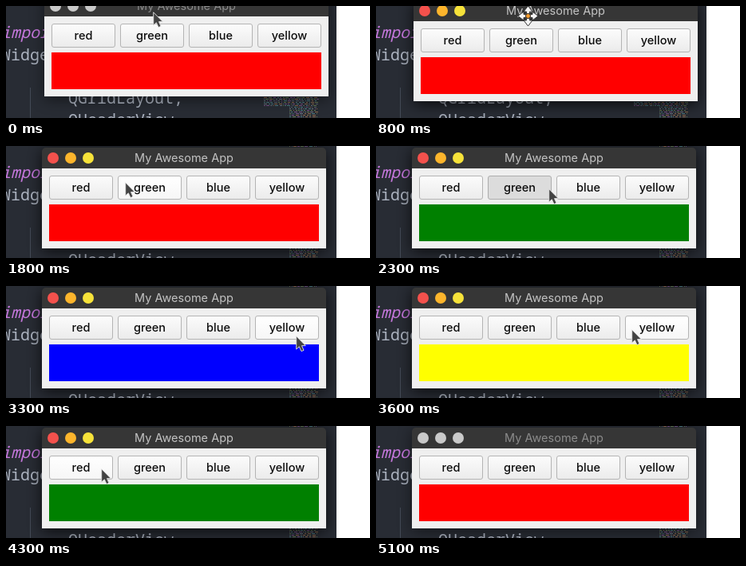
Recreate the animation shown at these times as an HTML page. Size 456 by 140 pixels, loop 5200 ms.

```html
<!DOCTYPE html>
<html lang="en">
<head>
<meta charset="utf-8">
<title>Colour buttons</title>
<style>
  html, body { margin: 0; width: 100%; height: 100%; overflow: hidden; background: #282c34; }
  svg { display: block; }
  .code { font: 20px "Noto Sans Mono", "DejaVu Sans Mono", monospace; fill: #abb2bf; }
  .code .kw { fill: #c678dd; font-style: italic; }
  .ui { font: 14.5px Inter, Roboto, sans-serif; text-anchor: middle; }
  .btn text { font-weight: 500; fill: #0c0c0c; }
  .btn rect { fill: url(#face); stroke: #b4b4b4; }
  .btn.hover rect { fill: url(#lit); }
  .btn.down rect { fill: #dcdcdc; stroke: #adadad; }
  #title { fill: #8b8b8b; }
  .active #title { fill: #c3c3c3; }
  .light { fill: #c9c9c9; }
  .active .light { fill: var(--c); }
  #shadow { opacity: .5; }
  .active #shadow { opacity: .75; }
</style>
</head>
<body>
<svg width="456" height="140" viewBox="0 0 456 140">
  <defs>
    <linearGradient id="face" x2="0" y2="1">
      <stop stop-color="#fcfcfc"/><stop offset="1" stop-color="#ebebeb"/>
    </linearGradient>
    <linearGradient id="lit" x2="0" y2="1">
      <stop stop-color="#fff"/><stop offset="1" stop-color="#f6f6f6"/>
    </linearGradient>
    <filter id="blur" x="-20%" y="-40%" width="140%" height="180%">
      <feGaussianBlur stdDeviation="9"/>
    </filter>
  </defs>

  <rect width="456" height="140" fill="#282c34"/>
  <g class="code">
    <text class="kw" x="-6" y="40">import</text>
    <text x="-6" y="68">Widgets</text>
    <text x="78" y="122">QGridLayout,</text>
    <text x="78" y="149">QHeaderView,</text>
  </g>
  <path d="M30.5 102V140" stroke="#434a56"/>
  <g id="minimap"></g>

  <g id="win">
    <rect id="shadow" x="45" y="6" width="356" height="126" filter="url(#blur)"/>
    <path d="M45 28V7a5 5 0 0 1 5-5H396a5 5 0 0 1 5 5V28Z" fill="#363636"/>
    <rect x="45" y="28" width="356" height="100" fill="#efefef"/>
    <g id="lights"></g>
    <g class="ui">
      <text id="title" x="223" y="20">My Awesome App</text>
      <g id="buttons"></g>
    </g>
    <rect id="panel" x="54" y="73" width="338" height="46"/>
  </g>
  <rect x="414" width="42" height="140" fill="#fff"/>

  <path id="arrow" d="M.7 .8V17L4.3 13.8 7 19.6 10 18.3 7.5 12.6H12.3Z"
        fill="#434343" stroke="#e4e4e4" stroke-width=".9" stroke-linejoin="round"/>
  <g id="mover" stroke="#333" stroke-linejoin="round"></g>
</svg>

<script>
const LOOP = 5200;
const $ = id => document.getElementById(id);
const names = ['red', 'green', 'blue', 'yellow'];

// Tracks: [time, ...value], each value holds until the next time.
const windowTrack = [
  [0, 3, -15], [700, 3, -13], [800, 2, -9], [900, 1, -5], [1000, 0, -1], [1100, 0, 0]
];
const activeTrack = [[0, false], [400, true], [5100, false]];
const panelTrack = [
  [0, 'red'], [2300, 'green'], [3000, 'blue'], [3400, 'yellow'],
  [3800, 'blue'], [4100, 'green'], [4400, 'red']
];
const pressTrack = [
  [0, ''], [2300, 'green'], [2400, ''], [3400, 'yellow'], [3500, ''],
  [3800, 'blue'], [3900, ''], [4100, 'green'], [4200, ''], [4400, 'red'], [4500, '']
];
const pointerTrack = [
  [0, 184, 7], [100, 185, 7], [400, 187, 7],
  [1400, 187, 22], [1600, 181, 27], [1700, 167, 36], [1800, 149, 45],
  [1900, 132, 52], [2000, 122, 55], [2100, 118, 54],
  [2200, 165, 54], [2300, 216, 53],
  [2600, 232, 53], [2700, 256, 53], [2800, 269, 53],
  [3300, 363, 62], [3400, 357, 55], [3600, 320, 54], [3700, 278, 53],
  [3900, 242, 53], [4000, 206, 53], [4200, 166, 53], [4300, 119, 53],
  [4600, 120, 12], [4700, 120, -40]
];
const DRAG = [500, 1400];

function at(track, t) {
  let row = track[0];
  for (const r of track) if (r[0] <= t) row = r;
  return row.slice(1);
}

function random(seed) {
  return () => (seed = (seed * 16807) % 2147483647) / 2147483647;
}

function drawMinimap() {
  const rnd = random(83);
  const inks = ['#6d7583', '#596270', '#8c6a50', '#4d7c83', '#795488', '#657b55'];
  let out = '';
  for (let y = 0; y < 140; y += 2) {
    let x = y > 110 && y < 126 ? 323 : 355;
    while (x < 390) {
      const w = 1 + Math.floor(rnd() * 4);
      const ink = inks[Math.floor(rnd() * inks.length)];
      out += `<rect x="${x}" y="${y}" width="${Math.min(w, 392 - x)}" height="1" fill="${ink}"/>`;
      x += w + 1 + Math.floor(rnd() * 2);
    }
  }
  $('minimap').innerHTML = out;
}

function build() {
  drawMinimap();
  $('lights').innerHTML = ['#f4514c', '#fdb52c', '#f6e23a'].map((c, i) =>
    `<circle class="light" style="--c:${c}" cx="${59 + 22 * i}" cy="15" r="7"/>`).join('');
  $('buttons').innerHTML = names.map((name, i) => {
    const x = 54 + 86 * i;
    return `<g class="btn" id="${name}"><rect x="${x + .5}" y="37.5" width="79" height="29" rx="2.5"/>` +
      `<text x="${x + 40}" y="57">${name}</text></g>`;
  }).join('');
  $('mover').innerHTML = [0, 90, 180, 270].map(a =>
    `<path transform="rotate(${a})" d="M0-12.5 5.5-5.5H2V-3H-2V-5.5H-5.5Z" fill="#f4f4f4"/>`).join('') +
    '<circle r="3" fill="#f29a2e"/>';
}

function draw(t) {
  const [dx, dy] = at(windowTrack, t);
  const [px, py] = at(pointerTrack, t);
  const [pressed] = at(pressTrack, t);
  const dragging = t >= DRAG[0] && t < DRAG[1];

  $('win').setAttribute('transform', `translate(${dx} ${dy})`);
  $('win').classList.toggle('active', at(activeTrack, t)[0]);
  $('panel').setAttribute('fill', at(panelTrack, t)[0]);

  names.forEach((name, i) => {
    const x = px - dx - 54 - 86 * i, y = py - dy - 37;
    const over = !dragging && x >= 0 && x < 80 && y >= 0 && y < 30;
    $(name).classList.toggle('hover', over);
    $(name).classList.toggle('down', pressed === name);
  });

  $('arrow').setAttribute('transform', `translate(${px} ${py})`);
  $('arrow').style.display = dragging ? 'none' : '';
  $('mover').setAttribute('transform', `translate(${188.5 + dx} ${21.5 + dy})`);
  $('mover').style.display = dragging ? '' : 'none';
}

build();
draw(0);
const start = performance.now();
function tick() {
  draw((performance.now() - start) % LOOP);
  requestAnimationFrame(tick);
}
requestAnimationFrame(tick);
</script>
</body>
</html>
```
